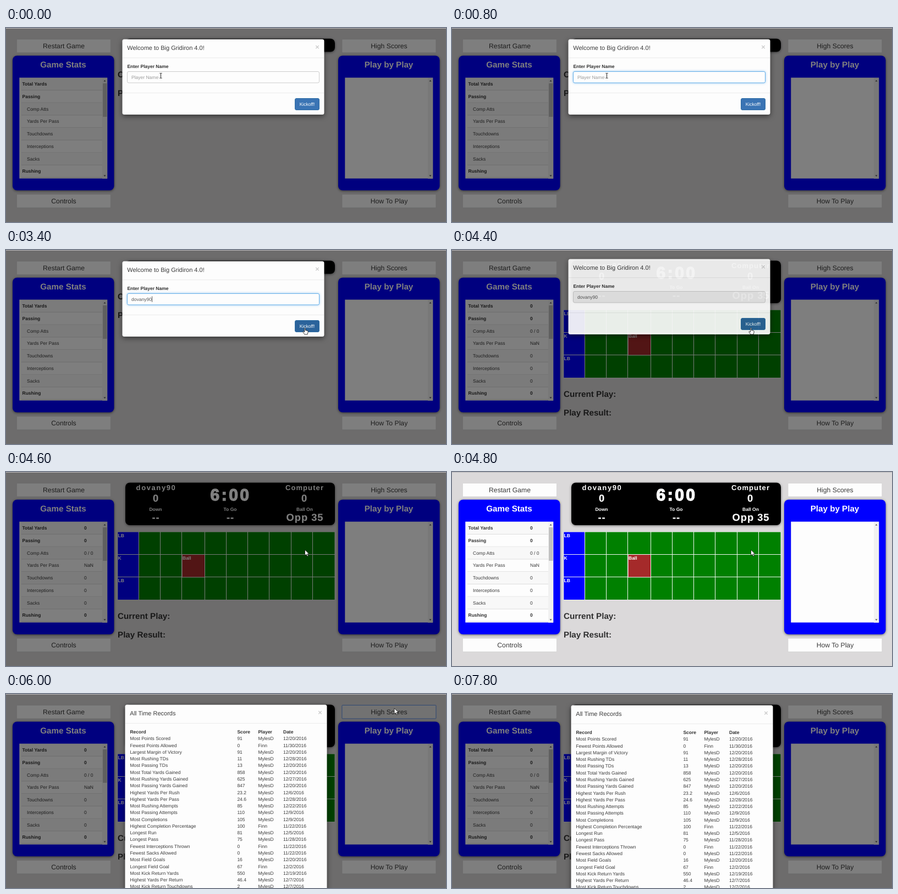
An HTML page for the animation above (8 s loop, 800 by 354 pixels).

```html
<!DOCTYPE html>
<html lang="en">
<head>
<meta charset="utf-8">
<title>Football game</title>
<style>
  html, body { margin: 0; width: 100%; height: 100%; overflow: hidden; background: #dbd9da; }
  svg { display: block; width: 800px; height: 354px; }
  text { font: 8.5px "Liberation Sans", Arial, sans-serif; fill: #3a3a3a; text-rendering: geometricPrecision; white-space: pre; }
  .b { font-weight: 700; fill: #303030; }
  .mid { text-anchor: middle; }
  .head { font-size: 15.2px; font-weight: 700; fill: #303030; }
  .big { font-size: 12.2px; }
  .title { font-size: 11px; }
  .close { font-size: 12.8px; font-weight: 700; fill: #ccc; }
  .name { font-size: 13px; font-weight: 700; fill: #fff; }
  .score { font-size: 18.3px; font-weight: 700; fill: #fff; letter-spacing: 1px; stroke: #fff; stroke-width: .2px; }
  .clock { font-size: 30px; font-weight: 700; fill: #fff; stroke: #fff; stroke-width: 1.5px; letter-spacing: 3.5px; }
  .white { fill: #fff; }
  .btn { fill: #fdfdfd; stroke: #ccc; stroke-width: .6px; }
  .panel { fill: #00f; filter: drop-shadow(0 1px 2px rgba(0,0,0,.55)); }
  .modal { fill: #fdfdfd; filter: drop-shadow(0 3px 5px rgba(0,0,0,.5)); }
  .rule { stroke: #ebebeb; }
  .grid { fill: none; stroke: #f4f8f4; }
  .field { fill: #fdfdfd; stroke: #ccc; }
  .field.focus { stroke: #66afe9; filter: drop-shadow(0 0 2px rgba(102,175,233,.7)); }
  .field.off { fill: #eee; }
  .btn.hover { fill: #e6e6e6; stroke: #adadad; }
  .btn.focus { fill: #e6e6e6; stroke: #5b8fe8; stroke-width: 1px; }
</style>
</head>
<body>
<svg id="stage" viewBox="0 0 800 354"></svg>
<script>
const LOOP = 8000, TICK = 200;
const PLAYER = 'dovany90';

const rect = (x, y, w, h, attrs = '') => `<rect x="${x}" y="${y}" width="${w}" height="${h}" ${attrs}/>`;
const text = (x, y, s, cls = '', attrs = '') => `<text x="${x}" y="${y}" class="${cls}" ${attrs}>${s}</text>`;
const line = (x1, y1, x2, y2, attrs) => `<path d="M${x1} ${y1}L${x2} ${y2}" ${attrs}/>`;
const group = (id, s) => `<g id="${id}">${s}</g>`;

const button = (x, y, label, id = '') =>
  rect(x + .4, y + .4, 171, 24.6, `rx="1" class="btn" id="${id}"`) + text(x + 86, y + 17, label, 'big mid');

const scrollbar = x =>
  rect(x, 91, 9, 184, 'fill="#f1f1f1"') +
  `<path d="M${x + 2.5} 97.5h4l-2-2.5zM${x + 2.5} 268.5h4l-2 2.5z" fill="#505050"/>`;

const panel = (x, title) =>
  rect(x, 50.5, 184.5, 245.8, 'rx="8" class="panel"') +
  text(x + 92, 72.2, title, 'head white mid') +
  rect(x + 12.3, 90.6, 160, 184, 'fill="#fdfdfd"') + scrollbar(x + 163);

function stats() {
  const rows = [['Total Yards', 0, 1], ['Passing', 0, 1], ['Comp Atts', '0 / 0'], ['Yards Per Pass', 'NaN'],
    ['Touchdowns', 0], ['Interceptions', 0], ['Sacks', 0], ['Rushing', 0, 1]];
  let names = '', values = '';
  rows.forEach(([name, value, bold], i) => {
    const y = 105 + i * 22.75, cls = bold ? 'b' : '';
    if (i % 2 === 0) names += rect(28, y - 14, 147, 22.7, 'fill="#f8f8f8"');
    names += text(bold ? 29.5 : 38, y, name, cls) + line(28, y + 8.5, 175, y + 8.5, 'stroke="#ddd"');
    values += text(142, y, value, cls);
  });
  return names + group('values', values) + rect(176, 101, 7.5, 61, 'fill="#c1c1c1"');
}

function scoreboard() {
  return text(273, 33, PLAYER, 'name mid', 'letter-spacing="1.6"') +
    text(543, 33, 'Computer', 'name mid', 'letter-spacing="1.1"') +
    text(272.5, 54.4, 0, 'score mid') + text(542.5, 53.6, 0, 'score mid') +
    text(408.5, 51.7, '6:00', 'clock mid') +
    [[272, 'Down', '--'], [407.5, 'To Go', '--'], [543, 'Ball On', 'Opp 35']].map(([x, label, value]) =>
      text(x, 70.8, label, 'b white mid') + text(x + .5, 89.3, value, 'score mid')).join('');
}

function pitch() {
  const cols = [242, 281, 320, 362, 401, 440, 479, 519, 558];
  let s = rect(203, 109, 395, 124, 'fill="#008000"') + rect(203, 109, 39, 124, 'fill="#00f"');
  for (const x of cols) s += line(x - .5, 109, x - .5, 233, 'class="grid"');
  for (const y of [150.5, 191.5]) s += line(203, y, 598, y, 'class="grid"');
  s += rect(203, 109.3, 394.8, 124, 'class="grid" stroke-width=".6"');
  s += rect(320, 150.5, 41.5, 41.5, 'fill="#a52a2a" stroke="#fff"');
  ['LB', 'K', 'LB'].forEach((label, i) => s += text(203.5, 118.5 + i * 41.3, label, 'b white'));
  return s + text(321, 160, 'Ball', 'b white');
}

const modalFrame = (x, h, title) =>
  rect(x + .5, 20.5, 367, h, 'rx="3.5" class="modal"') + text(x + 9.3, 40.4, title, 'title') +
  text(x + 355, 39, '×', 'close mid') + line(x + 1, 54.5, x + 367, 54.5, 'class="rule"');

const welcome = () =>
  modalFrame(211, 137.5, 'Welcome to Big Gridiron 4.0!') +
  line(212, 118.5, 578, 118.5, 'class="rule"') +
  text(220.4, 73.3, 'Enter Player Name', 'b') +
  rect(220.5, 79.5, 349, 20.5, 'rx="2.5" class="field" id="field"') +
  text(228, 92.8, '', '', 'id="entry"') + rect(0, 84.5, .8, 10.5, 'id="caret" fill="#333"') +
  rect(525.5, 128.5, 44, 21, 'rx="2.5" fill="#3a74b4" stroke="#2e6da4" id="kick"') +
  text(547.5, 142, 'Kickoff!', 'white mid');

// Rows: record | score | player initial | date in 2016
const RECORDS = `Most Points Scored|91|M|12/20
Fewest Points Allowed|0|F|11/30
Largest Margin of Victory|91|M|12/20
Most Rushing TDs|11|M|12/28
Most Passing TDs|13|M|12/20
Most Total Yards Gained|858|M|12/20
Most Rushing Yards Gained|625|M|12/27
Most Passing Yards Gained|847|M|12/20
Highest Yards Per Rush|23.2|M|12/6
Highest Yards Per Pass|24.6|M|12/28
Most Rushing Attempts|85|M|12/22
Most Passing Attempts|110|M|12/9
Most Completions|105|M|12/9
Highest Completion Percentage|100|F|11/22
Longest Run|81|M|12/5
Longest Pass|75|M|11/28
Fewest Interceptions Thrown|0|F|11/22
Fewest Sacks Allowed|0|M|11/22
Most Field Goals|16|M|12/20
Longest Field Goal|67|F|12/2
Most Kick Return Yards|550|M|12/19
Highest Yards Per Return|46.4|M|12/7
Most Kick Return Touchdowns|2|M|12/7`;

function records() {
  const row = (cells, y, cls) => cells.map((c, i) => text([225.4, 420.4, 458.4, 504][i], y, c, cls)).join('');
  const players = { M: 'MylesD', F: 'Finn' };
  return modalFrame(216, 460, 'All Time Records') +
    row(['Record', 'Score', 'Player', 'Date'], 73.2, 'b') +
    RECORDS.split('\n').map((r, i) => {
      const [name, score, who, day] = r.split('|');
      return row([name, score, players[who], day + '/2016'], 85.4 + i * 12.27, '');
    }).join('');
}

const CURSORS = {
  beam: '<path d="M-2-4.5h1.5l.5.5.5-.5H2M0-4V4M-2 4.5h1.5l.5-.5.5.5H2" fill="none" stroke="#222" stroke-width="1"/>',
  arrow: '<path d="M0 0V10.5L2.5 8.2 4.2 12 6 11.2 4.3 7.6H7.5Z" fill="#fff" stroke="#111" stroke-width=".8"/>',
  hand: '<path d="M-.8 .8Q0-.6.8.8V4.4L5 5.4Q6 6 5.6 8L4.6 12H-.6L-3.6 7.6Q-3.6 6-2 6.8L-.8 8Z" fill="#fff" stroke="#111" stroke-width=".8"/>'
};

const stage = document.getElementById('stage');
stage.innerHTML =
  rect(0, 0, 800, 354, 'fill="#dbd9da"') +
  button(19, 20, 'Restart Game') + button(19, 303, 'Controls') +
  button(610.5, 20, 'High Scores', 'scores') + button(610.5, 303, 'How To Play') +
  panel(12, 'Game Stats') + panel(604, 'Play by Play') + stats() +
  rect(217, 19.5, 381, 77.5, 'rx="8" id="board" style="filter:drop-shadow(0 1px 2px rgba(0,0,0,.5))"') +
  group('game', scoreboard() + pitch()) +
  group('captions', text(203, 268, 'Current Play:', 'head') + text(203, 302, 'Play Result:', 'head')) +
  rect(0, 0, 800, 354, 'id="shade"') +
  group('welcome', welcome()) + group('records', records()) +
  rect(0, 0, 800, 1, 'fill="#bcbabb"') +
  Object.entries(CURSORS).map(([id, s]) => group(id, s)).join('');

const $ = id => document.getElementById(id);
const show = (id, on) => $(id).style.display = on ? '' : 'none';

function place(id, dy, opacity) {
  show(id, opacity > 0);
  $(id).setAttribute('transform', `translate(0 ${dy})`);
  $(id).setAttribute('opacity', opacity);
}

// time, x, y of the pointer
const PATH = [[0, 281.5, 87], [2800, 281.5, 87], [3400, 543.5, 142], [5000, 543.5, 142],
  [5400, 706, 26], [7000, 706, 26], [7600, 560, 250]];

function pointer(t) {
  const i = Math.max(1, PATH.findIndex(p => p[0] > t));
  const [t0, x0, y0] = PATH[i - 1], [t1, x1, y1] = PATH[i];
  const k = (t - t0) / (t1 - t0), e = k * k * (3 - 2 * k);
  return [x0 + (x1 - x0) * e, y0 + (y1 - y0) * e];
}

function drawPointer(t) {
  const visible = t < 7600;
  const [x, y] = visible ? pointer(t) : [0, 0];
  const overKick = t < 4600 && x > 525 && y > 128;
  const overField = t < 4400 && x < 570 && y > 79 && y < 100;
  const kind = overKick ? 'hand' : overField ? 'beam' : 'arrow';
  for (const id in CURSORS) show(id, visible && id === kind);
  $(kind).setAttribute('transform', `translate(${x} ${y})`);
  $('kick').setAttribute('fill', overKick ? '#2b639b' : '#3a74b4');
}

function drawEntry(t) {
  const keys = [1200, 1400, 1600, 1600, 1800, 2000, 2400, 2600];
  const typed = PLAYER.slice(0, keys.filter(k => k <= t).length);
  const focus = t >= 400 && t < 4200;
  const entry = $('entry');
  entry.textContent = typed || 'Player Name';
  entry.style.fill = typed ? '#555' : '#999';
  $('field').setAttribute('class', 'field' + (focus ? ' focus' : t >= 4400 ? ' off' : ''));
  show('caret', focus && t % 1000 < 600);
  $('caret').setAttribute('x', 228.4 + (typed ? entry.getComputedTextLength() : 0));
}

function render(t) {
  const started = t >= 4400;
  show('values', started);
  show('game', started);
  $('board').setAttribute('height', started ? 77.5 : 24);
  $('captions').setAttribute('transform', `translate(0 ${started ? 0 : -178})`);
  $('shade').setAttribute('opacity', t < 4800 || t >= 5800 ? .5 : t >= 5600 ? .12 : 0);

  place('welcome', started ? -4 : 0, t < 4400 ? 1 : t < 4600 ? .92 : 0);
  place('records', t < 6000 ? -66 : t < 6200 ? -1 : 0, t < 5800 ? 0 : t < 6000 ? .53 : 1);

  const hover = t >= 5400 && t < 5800, focus = t >= 5600 && t < 6200;
  $('scores').setAttribute('class', 'btn' + (hover ? ' hover' : '') + (focus ? ' focus' : ''));
  drawEntry(t);
  drawPointer(t);
}

let last = -1;
function frame() {
  const t = Math.floor(performance.now() % LOOP / TICK) * TICK;
  if (t !== last) render(last = t);
  requestAnimationFrame(frame);
}
frame();
</script>
</body>
</html>
```
